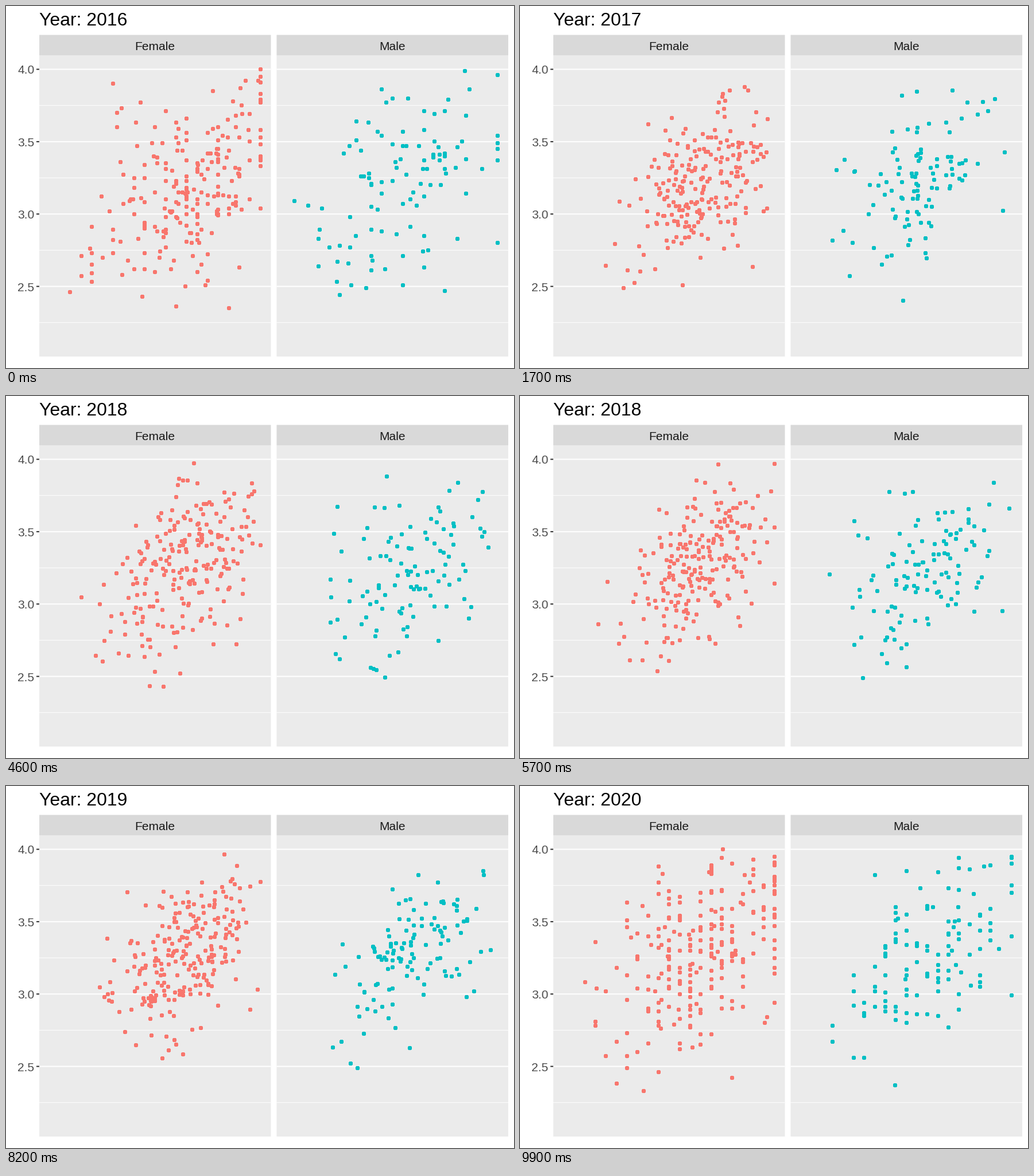
A matplotlib script that plays this animation: 885 px wide and 632 px high, repeating every 10000 ms.

```python
import numpy as np
import matplotlib.pyplot as plt
from matplotlib.animation import FuncAnimation
from matplotlib.patches import Rectangle

W, H, DPI = 885, 632, 64
FRAMES = 100
YEARS = np.arange(2016, 2021)
KEYS = np.rint(np.linspace(0, FRAMES - 1, len(YEARS))).astype(int)

LEFT, PANEL_W, GAP = 58, 403.5, 10
STRIP_TOP, PANEL_TOP, BOTTOM = 50.5, 86.5, 612
UNIT_X = PANEL_W / 22            # 20 units plus 5% on either side
UNIT_Y, TOP = 252.7, 110.5       # pixels per unit, place of 4.0
TEXT, TITLE, DOT = 21, 32, 7

# first count, yearly growth, first mean x, yearly shift, spread of x
GROUPS = {"Female": ("#F8766D", 222, 4, 13.0, 0.0, 4.4),
          "Male": ("#00BFC4", 106, 4, 11.2, 0.3, 4.8)}

plt.rcParams["font.family"] = ["Liberation Sans", "DejaVu Sans"]
rng = np.random.default_rng(16)


def sample(k, count, growth, mean, shift, spread, r=0.45):
    """Correlated cloud of year k, folded into the scale limits."""
    n = count + growth * k
    a, b = rng.standard_normal((2, n))
    low = 2.5 * np.sin(np.pi * k / 4)
    x = np.minimum(low + np.abs(mean + shift * k + spread * a - low), 20)
    x = np.where(rng.random(n) < 0.5 + 0.07 * k, np.rint(x), np.round(x, 1))
    y = 3.22 + 0.02 * k + 0.38 * (r * a + np.sqrt(1 - r * r) * b)
    y = 4 - np.abs(4 - y)
    return np.column_stack([x, np.round(2.3 + np.abs(y - 2.3), 2)])


def state(years, i):
    k = min(np.searchsorted(KEYS, i, side="right") - 1, len(KEYS) - 2)
    a, b = years[k], years[k + 1]
    t = (i - KEYS[k]) / (KEYS[k + 1] - KEYS[k])
    if t in (0, 1):
        return b if t else a
    # unmatched points exist only on their own year
    n = min(len(a), len(b))
    return a[:n] + (b[:n] - a[:n]) * t


def y_px(value):
    return TOP + (4 - value) * UNIT_Y


def to_px(points, left):
    """Centres of the whole pixels that the points fall in."""
    x = left + (points[:, 0] + 1) * UNIT_X
    return np.floor(np.column_stack([x, y_px(points[:, 1])])) + 0.5


fig = plt.figure(figsize=(W / DPI, H / DPI), dpi=DPI, facecolor="white")
ax = fig.add_axes([0, 0, 1, 1])
ax.set_xlim(0, W)
ax.set_ylim(H, 0)
ax.axis("off")


def box(x, y, w, h, color):
    ax.add_patch(Rectangle((x, y), w, h, fc=color, lw=0, snap=False))


def rule(x, w, value, weight, color="white"):
    box(x, y_px(value) - weight / 2, w, weight, color)


def label(x, y, text, px, color, ha):
    return ax.text(x, y, text, fontsize=px * 72 / DPI, color=color,
                   ha=ha, va="baseline")


MAJOR = np.arange(2.5, 4.1, 0.5)
panels = []
for j, (name, (color, *shape)) in enumerate(GROUPS.items()):
    left = LEFT + j * (PANEL_W + GAP)
    box(left, STRIP_TOP, PANEL_W, PANEL_TOP - STRIP_TOP, "#D9D9D9")
    box(left, PANEL_TOP, PANEL_W, BOTTOM - PANEL_TOP, "#EBEBEB")
    for v in MAJOR:
        rule(left, PANEL_W, v - 0.25, 1)
        rule(left, PANEL_W, v, 2)
    label(left + PANEL_W / 2, 77, name, TEXT, "#1A1A1A", "center")
    # two flags keep each dot exactly on its pixel
    dots = ax.scatter([], [], s=(DOT * 72 / DPI) ** 2, c=color, linewidths=0,
                      antialiased=(False, False), zorder=3)
    years = [sample(k, *shape) for k in range(len(YEARS))]
    panels.append((dots, years, left))

for v in MAJOR:
    rule(LEFT - 5, 5, v, 2, "#333333")
    label(LEFT - 8.5, np.rint(y_px(v)) + 8, f"{v:.1f}", TEXT, "#4D4D4D",
          "right")

title = label(LEFT, 34, "", TITLE, "black", "left")


def draw(i):
    year = YEARS[0] + (YEARS[-1] - YEARS[0]) * i / (FRAMES - 1)
    title.set_text(f"Year: {round(year)}")
    for dots, years, left in panels:
        dots.set_offsets(to_px(state(years, i), left))
    return [title] + [p[0] for p in panels]


anim = FuncAnimation(fig, draw, frames=FRAMES, interval=100,
                     repeat=True, repeat_delay=0, blit=False)
plt.show()
```
